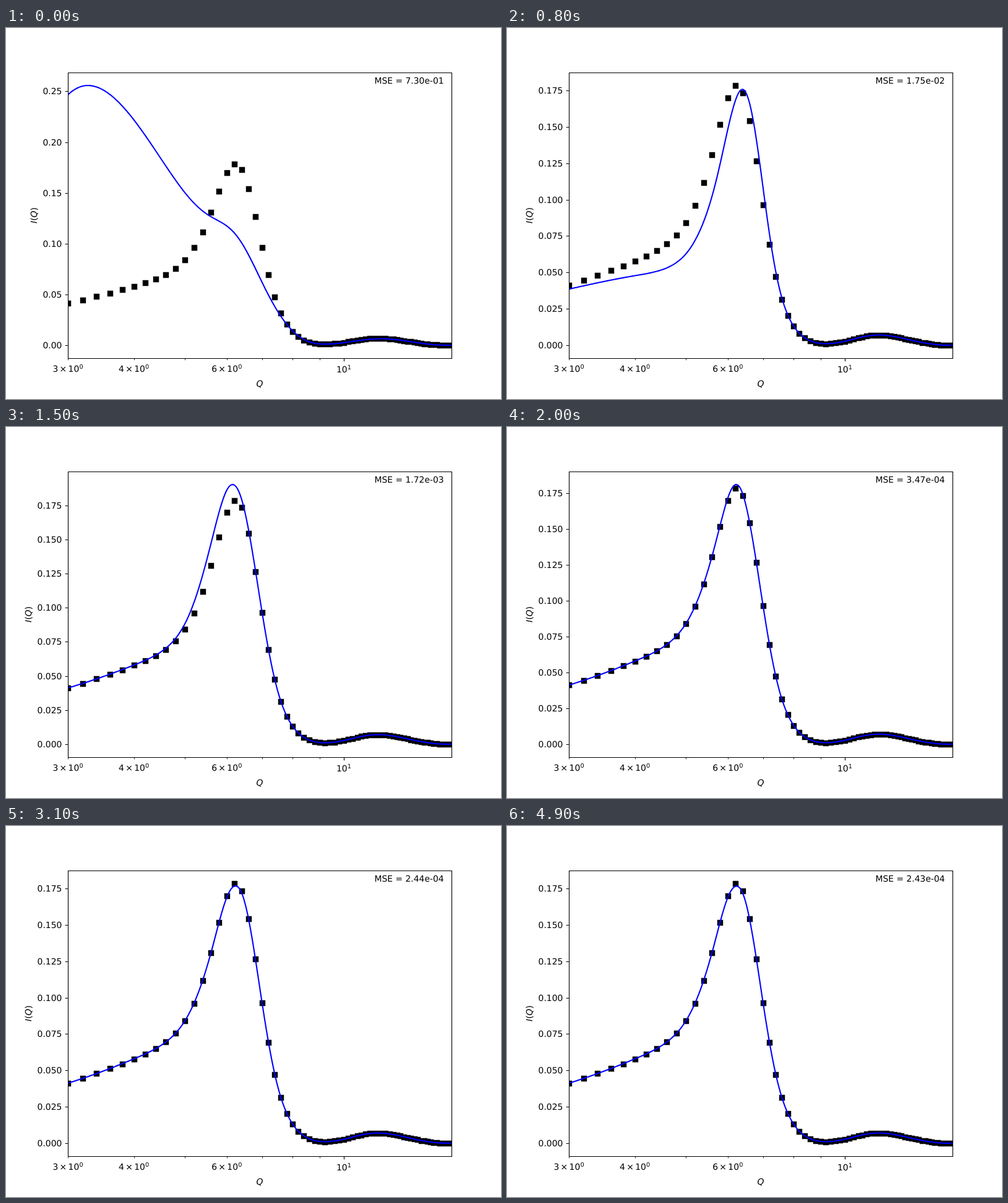
Animation, 800 px wide and 600 px high, one loop 5.1 s. Source, as an HTML page:

```html
<!DOCTYPE html>
<html lang="en">
<head>
<meta charset="utf-8">
<title>Curve fit</title>
<style>
  html, body { margin: 0; width: 100%; height: 100%; overflow: hidden; background: #fff; }
  svg { display: block; width: 100vw; height: 100vh; }
  text {
    font: 13.89px "DejaVu Sans", sans-serif; fill: #000;
    white-space: pre; text-rendering: geometricPrecision;
  }
  .sup { font-size: 9.72px; }
  .it { font-style: italic; }
  .axis { stroke: #000; stroke-width: 1.11; fill: none; }
  .minor { stroke-width: .83; }
</style>
</head>
<body>
<svg id="stage" viewBox="0 0 800 600">
  <clipPath id="box"><rect x="100" y="72" width="620" height="462"/></clipPath>
  <g clip-path="url(#box)">
    <path id="dots"/>
    <path id="curve" fill="none" stroke="#00f" stroke-width="2.08" stroke-linejoin="round"/>
  </g>
  <path id="yTicks" class="axis"/>
  <path id="minor" class="axis minor"/>
  <path class="axis" d="M546.5 534.5v4.86M100.5 72.5H720.5V534.5H100.5Z"/>
  <g id="xLabels"></g>
  <g id="yLabels"></g>
  <text class="it" x="410" y="580" text-anchor="middle">Q</text>
  <text id="yName" text-anchor="middle"><tspan class="it">I</tspan>(<tspan class="it">Q</tspan>)</text>
  <text id="mse" x="707.6" y="90" text-anchor="end"></text>
</svg>
<script>
const LEFT = 100, WIDTH = 620, BASE = 513, RISE = 420;
const STEP = 100, LOOP = 5100, LAST = 49;
const Q0 = 3, Q1 = 16, RADIUS = .49;

const $ = id => document.getElementById(id);
const xOf = q => LEFT + WIDTH * Math.log(q / Q0) / Math.log(Q1 / Q0);
const qAt = x => Q0 * (Q1 / Q0) ** ((x - LEFT) / WIDTH);
const mix = (a, b, p) => a + (b - a) * p;
const bump = (q, mid, width) => Math.exp(-(((q - mid) / width) ** 2));
const rise = (q, mid, width) => 1 / (1 + Math.exp((mid - q) / width));

// Natural cubic spline through [x, y] points.
function spline(pts) {
  const n = pts.length, m = Array(n).fill(0), c = Array(n).fill(0);
  const gap = i => pts[i + 1][0] - pts[i][0];
  const slope = i => (pts[i + 1][1] - pts[i][1]) / gap(i);
  for (let i = 1; i < n - 1; i++) {
    const den = 2 * (gap(i - 1) + gap(i)) - gap(i - 1) * c[i - 1];
    c[i] = gap(i) / den;
    m[i] = (6 * (slope(i) - slope(i - 1)) - gap(i - 1) * m[i - 1]) / den;
  }
  for (let i = n - 2; i > 0; i--) m[i] -= c[i] * m[i + 1];
  return x => {
    let i = 0;
    while (i < n - 2 && x > pts[i + 1][0]) i++;
    const h = gap(i), b = (x - pts[i][0]) / h, a = 1 - b;
    return a * pts[i][1] + b * pts[i + 1][1] +
      ((a ** 3 - a) * m[i] + (b ** 3 - b) * m[i + 1]) * h * h / 6;
  };
}

// Scattering by a sphere, and the blur that keeps its first zero above the axis.
function sphere(q) {
  const x = q * RADIUS;
  return (3 * (Math.sin(x) - x * Math.cos(x)) / x ** 3) ** 2;
}
const blur = q => .0011 * bump(q, 9, 1);

// Logarithm of the measured structure factor at a few key points.
const logOrder = spline([[3, -2.743], [4, -2.033], [5, -1.149], [5.6, -.317], [6, .25],
  [6.2, .467], [6.4, .618], [6.8, .705], [7.2, .573], [7.6, .345], [8.2, .1], [9, 0],
  [11, -.02], [13.5, -.2], [16, -.1]]);
const order = q => Math.exp(logOrder(q));
const firstOrder = q => .525 - .14 * Math.exp((3 - q) / .6) +
  .78 * rise(q, 6.05, .38) - .45 * rise(q, 9, .4);

const measured = q => sphere(q) * order(q) + blur(q);

function fitted(q, { start, dip, peak, shoulder, tip }) {
  const warp = 1 - dip * bump(q, 5.1, 1.8) + peak * bump(q, 6.8, .75) +
    shoulder * bump(q, 5.65, .68) + tip * bump(q, 6.2, .3);
  return sphere(q) * mix(order(q) * warp, firstOrder(q), start) + blur(q);
}

const rest = { start: 0, dip: 0, peak: 0, shoulder: 0, tip: 0 };
const keys = [
  { t: 0, start: 1, mse: .73 },
  { t: 500, dip: .3, peak: .6, mse: .052 },
  { t: 800, dip: .255, peak: .22, mse: .0175 },
  { t: 1200, shoulder: .1, mse: 3.06e-3 },
  { t: 1400, shoulder: .148, mse: 2.35e-3 },
  { t: 1600, shoulder: .1, mse: 1.26e-3 },
  { t: 2000, tip: .014, mse: 3.47e-4 },
  { t: 2600, tip: -.008, mse: 2.48e-4 },
  { t: 3000, tip: -.01, mse: 2.44e-4 },
  { t: 3800, tip: -.011, mse: 2.44e-4 },
  { t: 4200, tip: -.011, mse: 2.43e-4 },
  { t: 4900, tip: -.011, mse: 2.43e-4 }
].map(k => ({ ...rest, ...k, mse: Math.log(k.mse) }));

function poseAt(t) {
  let i = 0;
  while (i < keys.length - 2 && t >= keys[i + 1].t) i++;
  const a = keys[i], b = keys[i + 1], p = (t - a.t) / (b.t - a.t), pose = {};
  for (const k in a) pose[k] = mix(a[k], b[k], p);
  return pose;
}

const points = Array.from({ length: 66 }, (_, i) => {
  const q = Q0 + i * .2;
  return [xOf(q), measured(q)];
});

function power(q) {
  const x = xOf(q), major = q === 10, y = major ? 557 : 556;
  const put = (dx, s) => `<text x="${x + dx}" y="${y}">${s}</text>`;
  const ten = major ? -12 : .6;
  return (major ? '' : put(-24.5, q) + put(-13.4, '×')) + put(ten, 10) +
    `<text class="sup" x="${x + ten + 17.9}" y="${y - 5.3}">${major ? 1 : 0}</text>`;
}
$('xLabels').innerHTML = [3, 4, 6, 10].map(power).join('');
$('minor').setAttribute('d', [3, 4, 5, 6, 7, 8, 9]
  .map(q => `M${Math.round(xOf(q)) + .5} 534.5v2.78`).join(''));

function draw(step) {
  const pose = poseAt(step * STEP);
  const line = Array.from({ length: WIDTH / 2 + 1 }, (_, i) => {
    const x = LEFT + 2 * i;
    return [x, fitted(qAt(x), pose)];
  });
  const top = Math.max(...[...line, ...points].map(p => p[1]));
  const yOf = v => BASE - RISE * v / top;

  $('curve').setAttribute('d', 'M' + line.map(([x, v]) => `${x} ${yOf(v).toFixed(2)}`).join('L'));
  $('dots').setAttribute('d', points.map(([x, v]) =>
    `M${Math.round(x) - 4.2} ${Math.round(yOf(v)) - 4.2}h9.4v9.4h-9.4z`).join(''));

  const coarse = top * 1.1 > .225, gap = coarse ? .05 : .025;
  let ticks = '', labels = '';
  for (let i = 0; i * gap <= top * 1.05; i++) {
    const y = Math.round(yOf(i * gap));
    ticks += `M100.5 ${y + .5}h-4.86`;
    labels += `<text x="90.3" y="${y + 5}" text-anchor="end">${(i * gap).toFixed(coarse ? 2 : 3)}</text>`;
  }
  $('yTicks').setAttribute('d', ticks);
  $('yLabels').innerHTML = labels;
  $('yName').setAttribute('transform', `translate(${coarse ? 50 : 41} 303) rotate(-90)`);
  $('mse').textContent = 'MSE = ' +
    Math.exp(pose.mse).toExponential(2).replace(/-(\d)$/, '-0$1');
}

let shown = -1;
function tick() {
  const step = Math.min(LAST, Math.floor(performance.now() % LOOP / STEP));
  if (step !== shown) draw(shown = step);
  requestAnimationFrame(tick);
}
tick();
</script>
</body>
</html>
```
